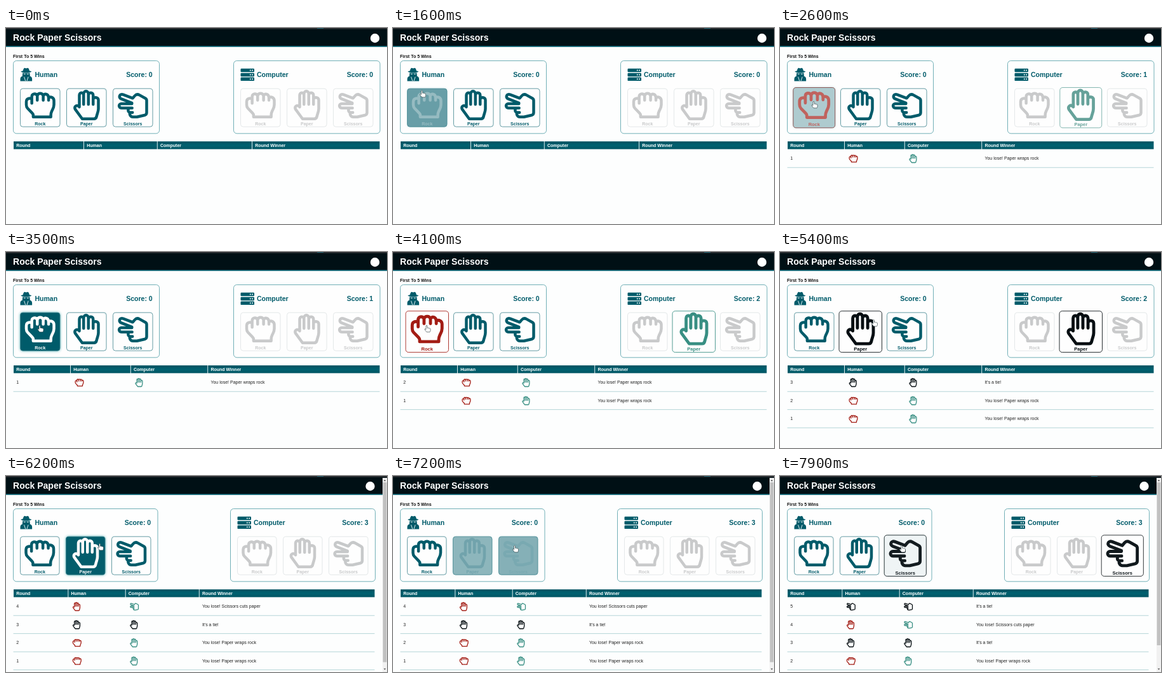
Write an HTML page with a canvas that moves like this. It is 600 px wide and 308 px high and loops after 8 s.

```html
<!DOCTYPE html>
<html lang="en">
<head>
<meta charset="utf-8">
<title>Rock Paper Scissors</title>
<style>
html, body { margin: 0; width: 100%; height: 100%; overflow: hidden; background: #fdfefe; }
canvas { display: block; width: 600px; height: 308px; }
</style>
</head>
<body>
<canvas id="stage" width="600" height="308"></canvas>
<script>
const ctx = document.getElementById('stage').getContext('2d');
const LOOP = 8000, HOVER_MS = 500, FLASH_MS = 1000, FLASH_GROWTH = .08;

const WHITE = [254, 254, 254], TEAL = [0, 91, 106], GRAY = [201, 202, 203], PALE = [222, 226, 228];
const RED = [163, 28, 20], GREEN = [56, 143, 131], BLACK = [6, 14, 18];
const rgb = c => `rgb(${c.map(Math.round).join()})`;
const mix = (a, b, k) => a.map((v, i) => v + (b[i] - v) * k);
const clamp = v => Math.min(1, Math.max(0, v));

// CSS "ease": cubic-bezier(.25, .1, .25, 1)
function ease(x) {
  if (x <= 0 || x >= 1) return clamp(x);
  const bez = (u, a, b) => 3 * u * (1 - u) ** 2 * a + 3 * u * u * (1 - u) * b + u ** 3;
  let lo = 0, hi = 1;
  for (let i = 0; i < 18; i++) {
    const mid = (lo + hi) / 2;
    if (bez(mid, .25, .25) < x) lo = mid; else hi = mid;
  }
  return bez(lo, .1, 1);
}

// Hand outlines on a 512-unit grid, stroked
const HANDS = {
  Rock: { width: 512, path: new Path2D(
    'M140 456V430Q140 408 122 390L46 312Q24 288 24 254V200C24 142 88 130 116 160V126' +
    'C112 60 182 52 208 100C226 50 288 50 308 100C336 54 396 72 398 134C440 108 488 136 488 184V250' +
    'C488 296 472 318 456 350Q436 390 436 424V456Z' +
    'M116 160V226M208 100V176M308 100V176M398 134V176') },
  Paper: { width: 448, path: new Path2D(
    'M152 488L36 330C6 286 60 240 104 288V92C104 38 176 38 176 92V74C176 8 256 8 256 74V92' +
    'C256 38 336 38 336 92V164C336 118 424 118 424 170V320C424 368 404 396 394 446Q386 488 350 488Z' +
    'M176 92V244M256 92V244M336 164V244') },
  Scissors: { width: 512, path: new Path2D(
    'M254 142L92 82C34 62 6 132 62 154L240 222V234H64C12 234 12 306 64 306H210' +
    'C166 306 164 380 212 380C190 412 220 456 256 456H326L454 427Q488 418 488 384V180' +
    'Q488 156 466 144L368 89Q322 64 290 100Z M210 306H244M212 380H250') }
};
const NAMES = Object.keys(HANDS);

const ROUNDS = [
  { at: 2400, human: 'Rock', computer: 'Paper', text: 'You lose! Paper wraps rock' },
  { at: 3600, human: 'Rock', computer: 'Paper', text: 'You lose! Paper wraps rock' },
  { at: 4900, human: 'Paper', computer: 'Paper', text: "It's a tie!" },
  { at: 6190, human: 'Paper', computer: 'Scissors', text: 'You lose! Scissors cuts paper' },
  { at: 7550, human: 'Scissors', computer: 'Scissors', text: "It's a tie!" }
];
const HOVERS = { Rock: [1430, 4410], Paper: [4430, 7040], Scissors: [7060, LOOP + 1] };
const isTie = r => r.human === r.computer;
const colorOf = (r, side) => isTie(r) ? BLACK : side === 'human' ? RED : GREEN;

// Page geometry before and after the scrollbar appears
const WIDE = { human: [11.5, 230], computer: [358.5, 230.5], pitch: 73, button: 62.5, mark: 581, right: 588.5 };
const NARROW = { human: [11.5, 227.5], computer: [353.5, 228], pitch: 72, button: 61.5, mark: 573.5, right: 580.5 };
const COLS_EMPTY = [12, 123, 238.7, 388];
const COLS_WIDE = [12, 102, 196.7, 318.2];
const COLS_NARROW = [12, 98.3, 188.6, 304.7];

function text(str, x, y, size, color, bold = true, align = 'left') {
  ctx.font = `${bold ? 'bold ' : ''}${size}px "Liberation Sans", Arial, sans-serif`;
  ctx.textAlign = align;
  ctx.fillStyle = color;
  ctx.fillText(str, x, y);
}

function rect(x, y, w, h, color) {
  ctx.fillStyle = color;
  ctx.fillRect(x, y, w, h);
}

function roundRect(x, y, w, h, r) {
  ctx.beginPath();
  ctx.roundRect(x, y, w, h, r);
}

function hand(name, cx, cy, size, color) {
  const { width, path } = HANDS[name], k = size / 512;
  ctx.save();
  ctx.translate(cx, cy);
  ctx.scale(k, k);
  ctx.translate(-width / 2, -256);
  ctx.lineWidth = 48;
  ctx.lineCap = ctx.lineJoin = 'round';
  ctx.strokeStyle = color;
  ctx.stroke(path);
  ctx.restore();
}

function hoverAmount(name, t) {
  const [enter, leave] = HOVERS[name];
  return t < leave ? ease((t - enter) / HOVER_MS) : 1 - ease((t - leave) / HOVER_MS);
}

function flashAmount(round, t) {
  const u = (t - round.at) / FLASH_MS;
  if (u < 0 || u >= 1) return 0;
  return u < .5 ? ease(u * 2) : 1 - ease(u * 2 - 1);
}

function button(name, side, x, width, t, round) {
  const human = side === 'human';
  const hover = human ? hoverAmount(name, t) : 0;
  const flash = round && round[side] === name ? flashAmount(round, t) : 0;
  let fill = mix(WHITE, TEAL, hover);
  let ink = human ? mix(TEAL, WHITE, hover) : GRAY;
  let edge = human ? mix(WHITE, TEAL, .75) : PALE;
  if (flash) {
    const peak = colorOf(round, side);
    fill = mix(fill, WHITE, flash);
    ink = mix(ink, peak, flash);
    edge = mix(edge, peak, flash);
  }
  const scale = 1 + FLASH_GROWTH * flash;
  ctx.save();
  ctx.translate(x + width / 2, 125.2);
  ctx.scale(scale, scale);
  roundRect(-width / 2, -30, width, 60, 4);
  ctx.shadowColor = `rgba(40,160,165,${hover ** 3 * (1 - flash) * .9})`;
  ctx.shadowBlur = 4;
  ctx.fillStyle = rgb(fill);
  ctx.fill();
  ctx.shadowColor = 'transparent';
  ctx.lineWidth = .8;
  ctx.strokeStyle = rgb(edge);
  ctx.stroke();
  hand(name, 0, -4.2, 48, rgb(ink));
  text(name, 0, 27.4, 7.03, rgb(ink), true, 'center');
  ctx.restore();
}

function agentIcon(x, y) {
  ctx.save();
  ctx.translate(x, y);
  ctx.fillStyle = rgb(TEAL);
  ctx.beginPath();
  ctx.ellipse(9.3, 5.8, 8.4, 1.6, 0, 0, 7);
  ctx.fill();
  ctx.fill(new Path2D('M4 5.5Q5 0 7 0L9.3 .8L11.6 0Q13.6 0 14.6 5.5Z'));
  ctx.fill(new Path2D('M3.6 7.6H15V10.6Q14 14.6 9.3 14.6Q4.6 14.6 3.6 10.6Z'));
  ctx.fill(new Path2D('M0 20.8V17.5Q0 14 3.6 12.8L3 11H15.6L15 12.8Q18.6 14 18.6 17.5V20.8Z'));
  ctx.strokeStyle = rgb(WHITE);
  ctx.lineWidth = .9;
  ctx.stroke(new Path2D('M5.4 9.6H8.2M10.4 9.6H13.2M6 14L8.2 20.4M12.6 14L10.4 20.4'));
  ctx.restore();
}

function serverIcon(x, y) {
  for (let i = 0; i < 3; i++) {
    const top = y + i * 6.9;
    roundRect(x, top, 21.5, 5.5, 1.2);
    ctx.fillStyle = rgb(TEAL);
    ctx.fill();
    for (const dx of [15.3, 18.6]) {
      ctx.beginPath();
      ctx.arc(x + dx, top + 2.75, 1, 0, 7);
      ctx.fillStyle = rgb(WHITE);
      ctx.fill();
    }
  }
}

function card(side, label, score, layout, t, round) {
  const [x, w] = layout[side];
  roundRect(x, 51.5, w, 114.3, 5);
  ctx.fillStyle = rgb(WHITE);
  ctx.fill();
  ctx.lineWidth = .8;
  ctx.strokeStyle = '#4f9ca5';
  ctx.stroke();
  if (side === 'human') agentIcon(x + 11, 62.8);
  else serverIcon(x + 11, 63.8);
  text(label, x + (side === 'human' ? 34 : 36.5), 77, 10.53, rgb(TEAL));
  text(`Score: ${score}`, x + w - 10.8, 77, 10.53, rgb(TEAL), true, 'right');
  NAMES.forEach((name, i) => button(name, side, x + 11 + i * layout.pitch, layout.button, t, round));
}

function table(played, cols, right) {
  const heads = ['Round', 'Human', 'Computer', 'Round Winner'];
  const shade = ctx.createLinearGradient(0, 178, 0, 190.5);
  shade.addColorStop(0, '#00505f');
  shade.addColorStop(.5, '#006170');
  shade.addColorStop(1, '#005563');
  heads.forEach((head, i) => {
    const end = i < 3 ? cols[i + 1] - .9 : right;
    rect(cols[i], 178.2, end - cols[i], 12.2, shade);
    text(head, cols[i] + 4.2, 186.7, 7.03, '#fff');
  });
  played.slice().reverse().forEach((round, i) => {
    const y = 204.8 + i * 28.5;
    text(played.length - i, cols[0] + 4.2, y + 2.2, 7.03, '#222', false);
    ['human', 'computer'].forEach((side, j) => {
      const name = round[side], size = 14.05;
      const half = HANDS[name].width / 1024 * size;
      hand(name, cols[j + 1] + 6.5 + half, y + .3, size, rgb(colorOf(round, side)));
    });
    text(round.text, cols[3] + 4.2, y + 2.2, 7.03, '#222', false);
    rect(cols[0] - .5, y + 14, right - cols[0] + .5, .8, '#a3cccf');
  });
}

function triangle(x, y, dy) {
  ctx.fillStyle = '#555';
  ctx.fill(new Path2D(`M${x - 1.8} ${y}h3.6l-1.8 ${dy}Z`));
}

function scrollbar(rows) {
  rect(593, 3, 7, 305, '#f1f1f1');
  rect(593.6, 10, 5.8, rows > 4 ? 256 : 282.5, '#c1c1c1');
  triangle(596.5, 8, -2.2);
  triangle(596.5, 302.5, 2.2);
}

function header(layout) {
  rect(0, 0, 600, 2, '#282c30');
  rect(490, 0, 10, 1, '#1f6474');
  rect(0, 2, 600, 26, '#001015');
  rect(0, 28, 600, 1.7, '#005b6a');
  text('Rock Paper Scissors', 11, 20.2, 14.04, '#fff');
  ctx.beginPath();
  ctx.arc(layout.mark, 16, 7.2, 0, 7);
  ctx.fillStyle = '#fff';
  ctx.fill();
}

const smooth = u => u * u * (3 - 2 * u);
const MOVES = [
  { from: 1300, to: 1600, x: 45.5, y: 98, curve: u => 1 - (1 - u) ** 2 },
  { from: 1600, to: 2000, x: 53, y: 115, curve: smooth },
  { from: 4320, to: 4590, x: 147.5, y: 106, curve: smooth },
  { from: 6980, to: 7160, x: 191.5, y: 109, curve: smooth }
];

function cursor(t) {
  if (t < 1300) return;
  let x = 214, y = 212;
  for (const m of MOVES) {
    const k = m.curve(clamp((t - m.from) / (m.to - m.from)));
    x += (m.x - x) * k;
    y += (m.y - y) * k;
  }
  const onButton = NAMES.some(n => t >= HOVERS[n][0] && t < HOVERS[n][1]);
  ctx.save();
  ctx.translate(x, y);
  const shape = onButton
    ? new Path2D('M-1 1Q0-.6 1 1V4.4Q2 3.6 2.9 4.7Q4 4 4.6 5.1Q6 4.8 6 6.2V8Q6 9.2 5 10.8H0L-3 7Q-3.4 5.4-2 5.8L-1 6.6Z')
    : new Path2D('M0 0V9L2 7.2L3.4 10.2L4.8 9.5L3.5 6.6H6.2Z');
  ctx.fillStyle = '#fff';
  ctx.fill(shape);
  ctx.lineWidth = .6;
  ctx.lineJoin = 'round';
  ctx.strokeStyle = '#26363a';
  ctx.stroke(shape);
  ctx.restore();
}

function draw(t) {
  const played = ROUNDS.filter(r => t >= r.at);
  const rows = played.length, latest = played[rows - 1];
  const scrolls = rows > 3;
  const layout = scrolls ? NARROW : WIDE;
  const cols = scrolls ? COLS_NARROW : rows ? COLS_WIDE : COLS_EMPTY;
  rect(0, 0, 600, 308, '#fdfefe');
  header(layout);
  text('First To 5 Wins', 11, 47.4, 7.03, '#111');
  card('human', 'Human', 0, layout, t, latest);
  card('computer', 'Computer', played.filter(r => !isTie(r)).length, layout, t, latest);
  table(played, cols, layout.right);
  if (scrolls) scrollbar(rows);
  cursor(t);
}

const start = performance.now();
function tick() {
  draw((performance.now() - start) % LOOP);
  requestAnimationFrame(tick);
}
tick();
</script>
</body>
</html>
```
